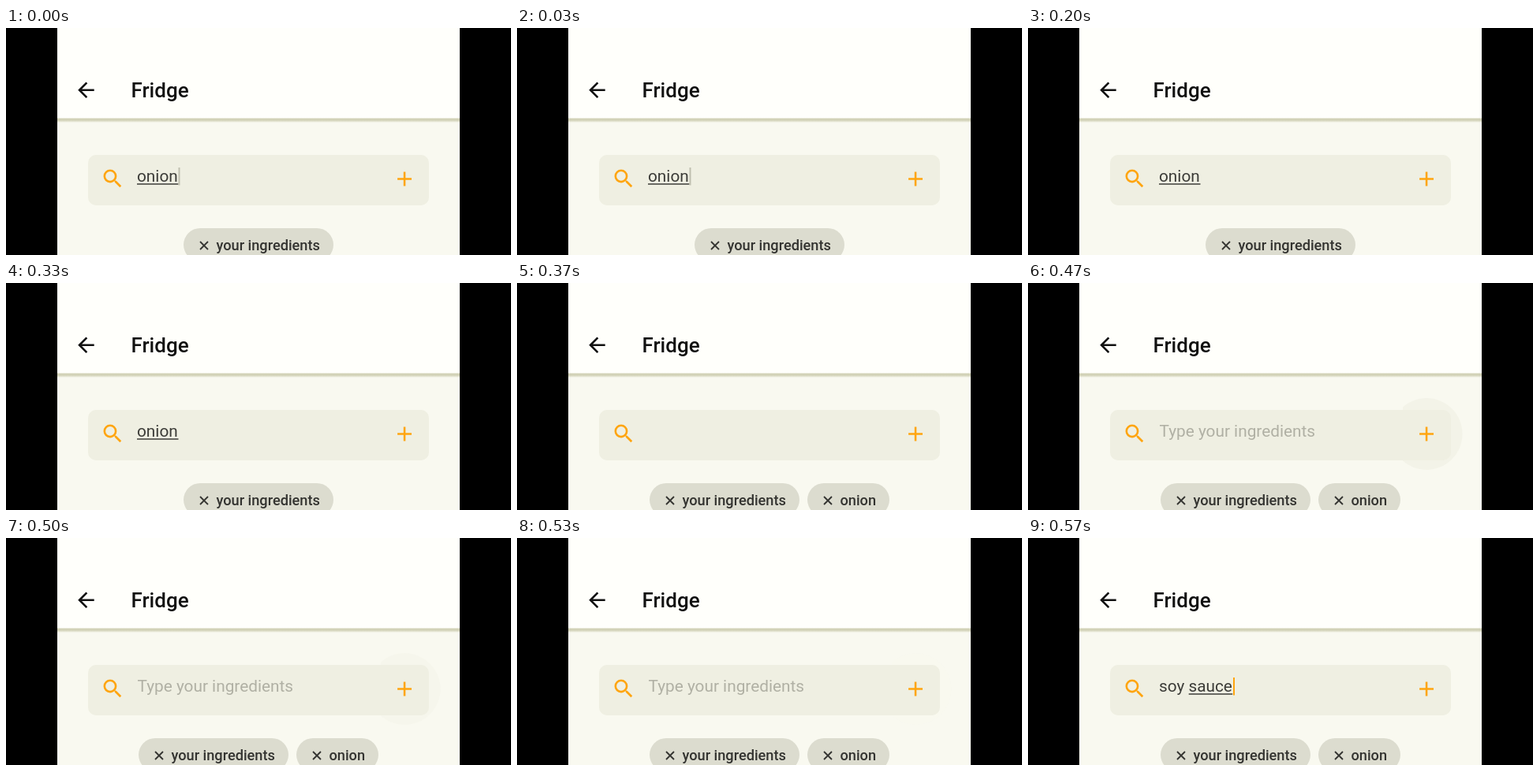
These frames come from a looping animation (640x288 px, 0.63 s). An HTML page:

```html
<!DOCTYPE html>
<html lang="en">
<head>
<meta charset="utf-8">
<style>
  html, body { margin: 0; width: 100%; height: 100%; overflow: hidden; background: #000; }
  svg { display: block; width: 640px; height: 288px; font-family: Roboto, sans-serif; }
  .title { font-size: 26px; font-weight: 500; fill: #111; }
  .entry { font-size: 20.8px; fill: #3c3c38; white-space: pre; }
  .chip { font-size: 18.2px; font-weight: 500; fill: #333330; }
  .accent { fill: #ffa50f; }
  .field { fill: #efefe2; }
  .pill { fill: #dcdccf; }
</style>
</head>
<body>
<svg viewBox="0 0 640 288">
  <defs>
    <linearGradient id="shade" x2="0" y2="1">
      <stop offset="0" stop-color="#d0d0b4"/>
      <stop offset=".5" stop-color="#d4d4ba"/>
      <stop offset="1" stop-color="#f9f9f0"/>
    </linearGradient>
    <clipPath id="right"><path d="M475 120h100v168H475z"/></clipPath>
    <path id="cross" d="M21 271l10 10m0-10l-10 10" stroke="#333330" stroke-width="1.8"/>
  </defs>

  <path d="M65 0h510v288H65z" fill="#f9f9f0"/>
  <path d="M65 0h510v115H65z" fill="#fffffb"/>
  <path d="M65 114.5h510v5.5H65z" fill="url(#shade)"/>
  <path transform="translate(86.1 63.4) scale(1.28)" fill="#111"
    d="M20 11H7.83l5.59-5.59L12 4l-8 8 8 8 1.41-1.41L7.83 13H20z"/>
  <text class="title" x="158.5" y="88.4">Fridge</text>

  <circle id="ripple" class="field" cx="505" cy="191.5" r="45.5" clip-path="url(#right)"/>
  <rect class="field" x="104" y="161" width="432" height="64" rx="10"/>
  <path class="accent" fill-rule="evenodd" transform="translate(119.6 175.6) scale(1.3)"
    d="M15.5 14h-.79l-.28-.27A6.47 6.47 0 0 0 16 9.5 6.5 6.5 0 1 0 9.5 16c1.61 0 3.09-.59 4.23-1.57l.27.28v.79l5 4.99L20.49 19zM9.5 14a4.5 4.5 0 1 1 0-9 4.5 4.5 0 0 1 0 9z"/>
  <path class="accent" transform="translate(489.7 176.2) scale(1.28)"
    d="M19 13h-6v6h-2v-6H5v-2h6V5h2v6h6z"/>

  <text id="hint" class="entry" x="166.5" y="195" style="fill:#b0b0a4">Type your ingredients</text>
  <g id="first">
    <text class="entry" x="166" y="195">onion</text>
    <path d="M166 197.2h52.5v1.5H166z" fill="#3c3c38"/>
  </g>
  <g id="second">
    <text class="entry" x="166" y="195">soy sauce</text>
    <path d="M203.7 197.2h55.5v1.5h-55.5z" fill="#3c3c38"/>
  </g>
  <rect id="caret" y="177" width="2" height="22.5"/>

  <g id="chipA">
    <rect class="pill" y="254" width="190" height="42" rx="21"/><use href="#cross"/>
    <text class="chip" x="41.5" y="282">your ingredients</text>
  </g>
  <g id="chipB" transform="translate(368)">
    <rect class="pill" y="254" width="104" height="42" rx="21"/><use href="#cross"/>
    <text class="chip" x="41.5" y="282">onion</text>
  </g>
</svg>
<script>
const LOOP = 630;
// Moments in ticks of 1/30 s
const BLINK = 6, ADD = 11, TYPE = 17;

const el = id => document.getElementById(id);
const clamp = v => Math.max(0, Math.min(1, v));
const show = (id, alpha) => el(id).setAttribute('opacity', +alpha);

function draw(t) {
  const tick = Math.floor((t + 3.5) * 0.03); // the screen holds still within a tick
  const added = tick >= ADD, typed = tick >= TYPE;
  show('ripple', tick > ADD && !typed && clamp(1 - (tick - ADD - 1) * 0.23));
  show('hint', !typed && clamp((tick - ADD) * 0.35));
  show('first', !added);
  show('second', typed);
  show('chipB', added);
  el('chipA').setAttribute('transform', `translate(${added ? 168 : 225})`);
  show('caret', tick < BLINK || typed);
  el('caret').setAttribute('x', typed ? 260 : 218.5);
  el('caret').setAttribute('fill', typed ? '#ffa50f' : '#c0c0b0');
}

function run() {
  draw(performance.now() % LOOP);
  requestAnimationFrame(run);
}
run();
</script>
</body>
</html>
```
